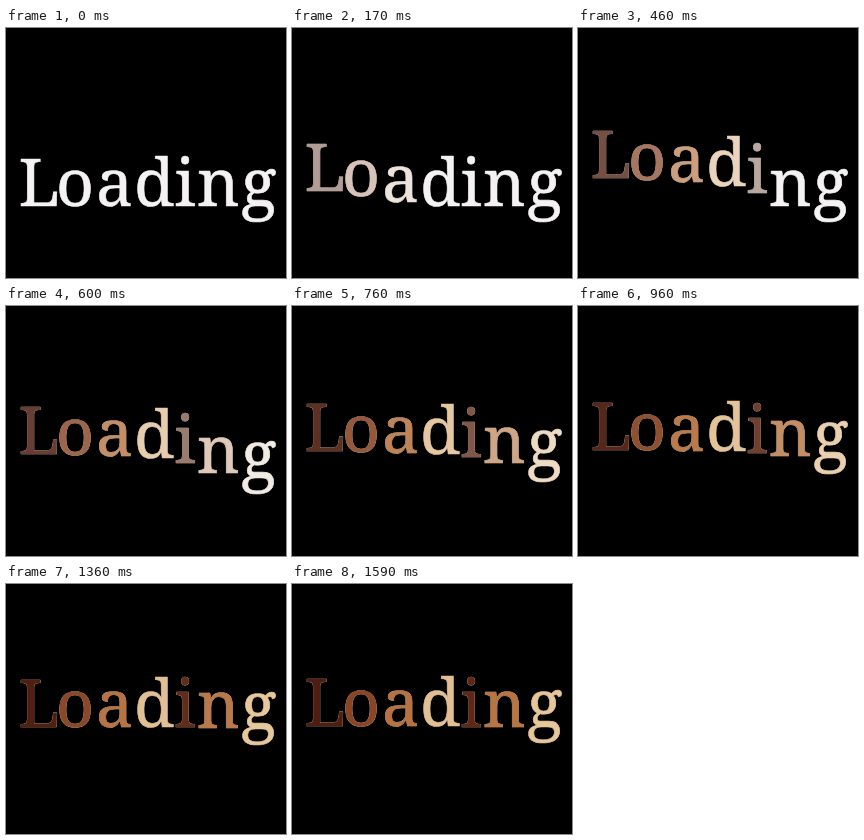
These frames come from a looping animation (280x250 px, 1660 ms). An HTML page with a canvas:

```html
<!DOCTYPE html>
<html lang="en">
<head>
<meta charset="utf-8">
<title>Loading</title>
<style>
  html, body { margin: 0; width: 100%; height: 100%; overflow: hidden; background: #000; }
  canvas { display: block; }
</style>
</head>
<body>
<canvas id="stage" width="280" height="250"></canvas>
<script>
const ctx = document.getElementById('stage').getContext('2d');
const LOOP = 1660, STEP = 33.125, LAST_STEP = 48;
const BASELINE = 178, RISE = 36, TAU = 320;
const WHITE = [244, 242, 242];
const CREAM = [232, 200, 160];

// x: pen position, start: moment the letter begins to rise
const letters = [
  { char: 'L', x: 12.5, start: 0, color: [78, 28, 15] },
  { char: 'o', x: 50, start: 65, color: [138, 68, 34] },
  { char: 'a', x: 90, start: 125, color: [184, 112, 62] },
  { char: 'd', x: 128, start: 195, color: [226, 190, 145] },
  { char: 'i', x: 168.5, start: 315, color: [92, 36, 18] },
  { char: 'n', x: 191, start: 475, color: [184, 112, 60] },
  { char: 'g', x: 235, start: 540, color: [230, 196, 150] }
];

const mix = (from, to, k) =>
  `rgb(${from.map((v, i) => Math.round(v + (to[i] - v) * k)).join(',')})`;

function drawLetter({ char, x, start, color }, time) {
  const progress = 1 - Math.exp(-Math.max(0, time - start) / TAU);
  const y = BASELINE - RISE * progress;
  ctx.strokeStyle = mix(WHITE, CREAM, progress);
  ctx.fillStyle = mix(WHITE, color, progress);
  ctx.strokeText(char, x, y);
  ctx.fillText(char, x, y);
}

function draw(now) {
  const step = Math.min(LAST_STEP, Math.floor((now % LOOP + 3) / STEP));
  ctx.fillStyle = '#000';
  ctx.fillRect(0, 0, 280, 250);
  ctx.font = '66px "Noto Serif", serif';
  ctx.lineWidth = 0.6;
  ctx.lineJoin = 'round';
  letters.forEach(letter => drawLetter(letter, step * STEP));
}

const origin = performance.now();
function tick() {
  draw(performance.now() - origin);
  requestAnimationFrame(tick);
}
tick();
</script>
</body>
</html>
```
